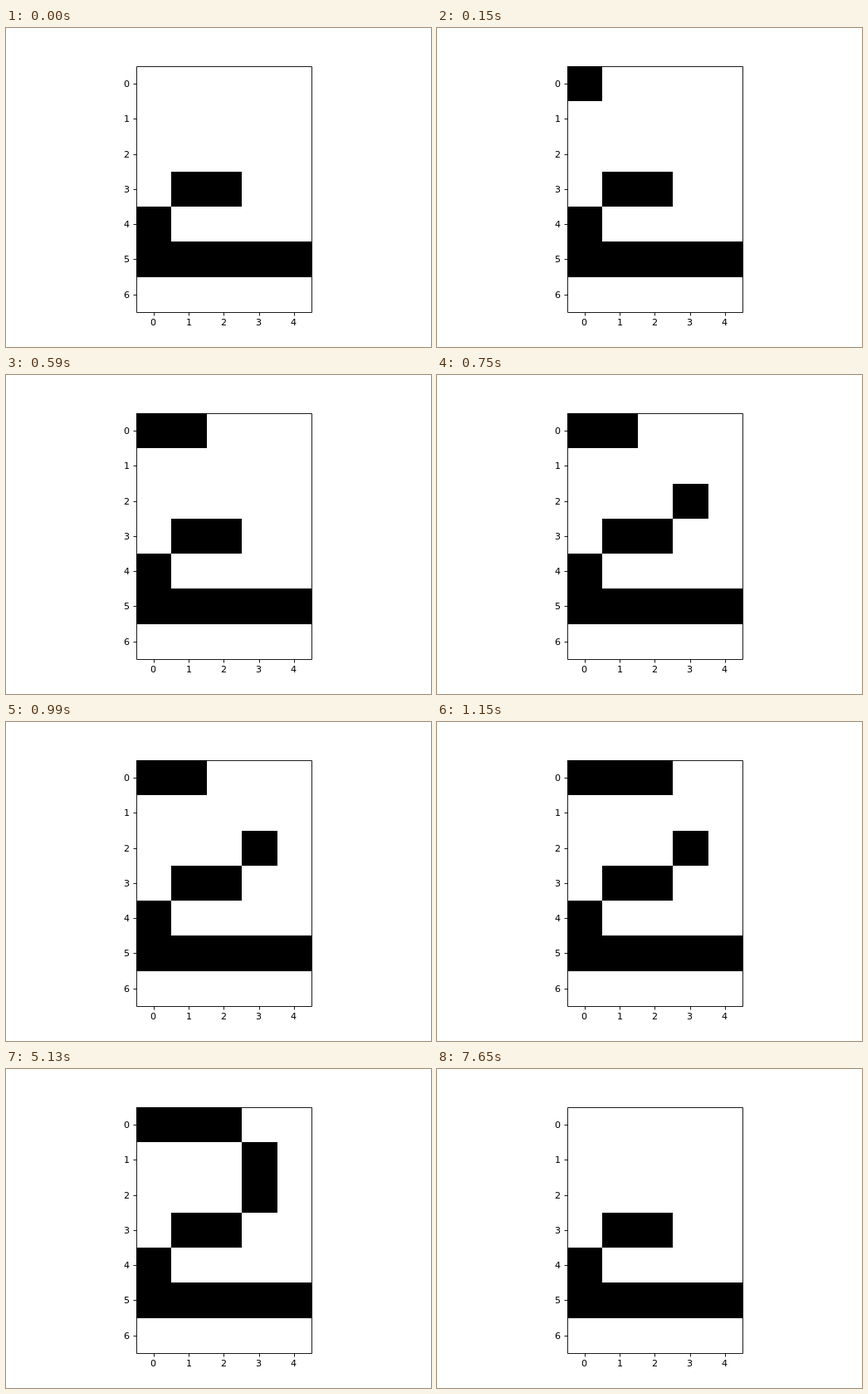
Recreate the animation shown at these times as an HTML page. Size 512x384 px, loop 7750 ms.

```html
<!DOCTYPE html>
<html lang="en">
<head>
<meta charset="utf-8">
<title>Pixel grid</title>
<style>
  html, body { margin: 0; width: 100%; height: 100%; overflow: hidden; background: #fff; }
  svg { display: block; width: 100%; height: 100%; }
  text { font: 11.11px "DejaVu Sans", sans-serif; }
</style>
</head>
<body>
<svg id="stage" viewBox="0 0 512 384"></svg>
<script>
const COLS = 5, ROWS = 7;
const LEFT = 157, TOP = 46, WIDTH = 212, HEIGHT = 296;
const LOOP = 7750, CLEAR = 7650;

// [column, row, time it turns on in ms]; cells at time 0 always stay on
const CELLS = [
  [1, 3, 0], [2, 3, 0], [0, 4, 0],
  [0, 5, 0], [1, 5, 0], [2, 5, 0], [3, 5, 0], [4, 5, 0],
  [0, 0, 150], [1, 0, 350], [3, 2, 750], [2, 0, 1150], [3, 1, 1350]
];

const stage = document.getElementById("stage");

function add(tag, attrs, text) {
  const el = document.createElementNS("http://www.w3.org/2000/svg", tag);
  for (const key in attrs) el.setAttribute(key, attrs[key]);
  if (text !== undefined) el.textContent = text;
  return stage.appendChild(el);
}

const edgeX = c => Math.round(LEFT + c * WIDTH / COLS);
const edgeY = r => Math.round(TOP + r * HEIGHT / ROWS);
const line = d => add("path", { d, fill: "none", stroke: "#000", "stroke-width": 0.889 });

const cells = CELLS.map(([c, r, on]) => {
  const x = edgeX(c), y = edgeY(r);
  const el = add("rect", {
    x, y, width: edgeX(c + 1) - x, height: edgeY(r + 1) - y, "shape-rendering": "crispEdges"
  });
  return { el, on };
});

line("M157.5 46.5H368.5V342.5H157.5Z");

// Ticks sit on whole pixels, at the unrounded cell centres
for (let c = 0; c < COLS; c++) {
  const x = 177.92 + c * 42.24;
  line(`M${Math.round(x) + 0.5} 342.5v4`);
  add("text", { x: Math.round(x - 3.53), y: 358 }, c);
}
for (let r = 0; r < ROWS; r++) {
  const y = Math.round(67.2 + r * 42.24);
  line(`M157.5 ${y + 0.5}h-4`);
  add("text", { x: 142, y: y + 4 }, r);
}

function draw(t) {
  for (const { el, on } of cells) {
    const lit = on === 0 || (t >= on && t < CLEAR);
    el.setAttribute("visibility", lit ? "visible" : "hidden");
  }
}

const start = performance.now();
function tick() {
  draw((performance.now() - start) % LOOP);
  requestAnimationFrame(tick);
}
draw(0);
requestAnimationFrame(tick);
</script>
</body>
</html>
```
